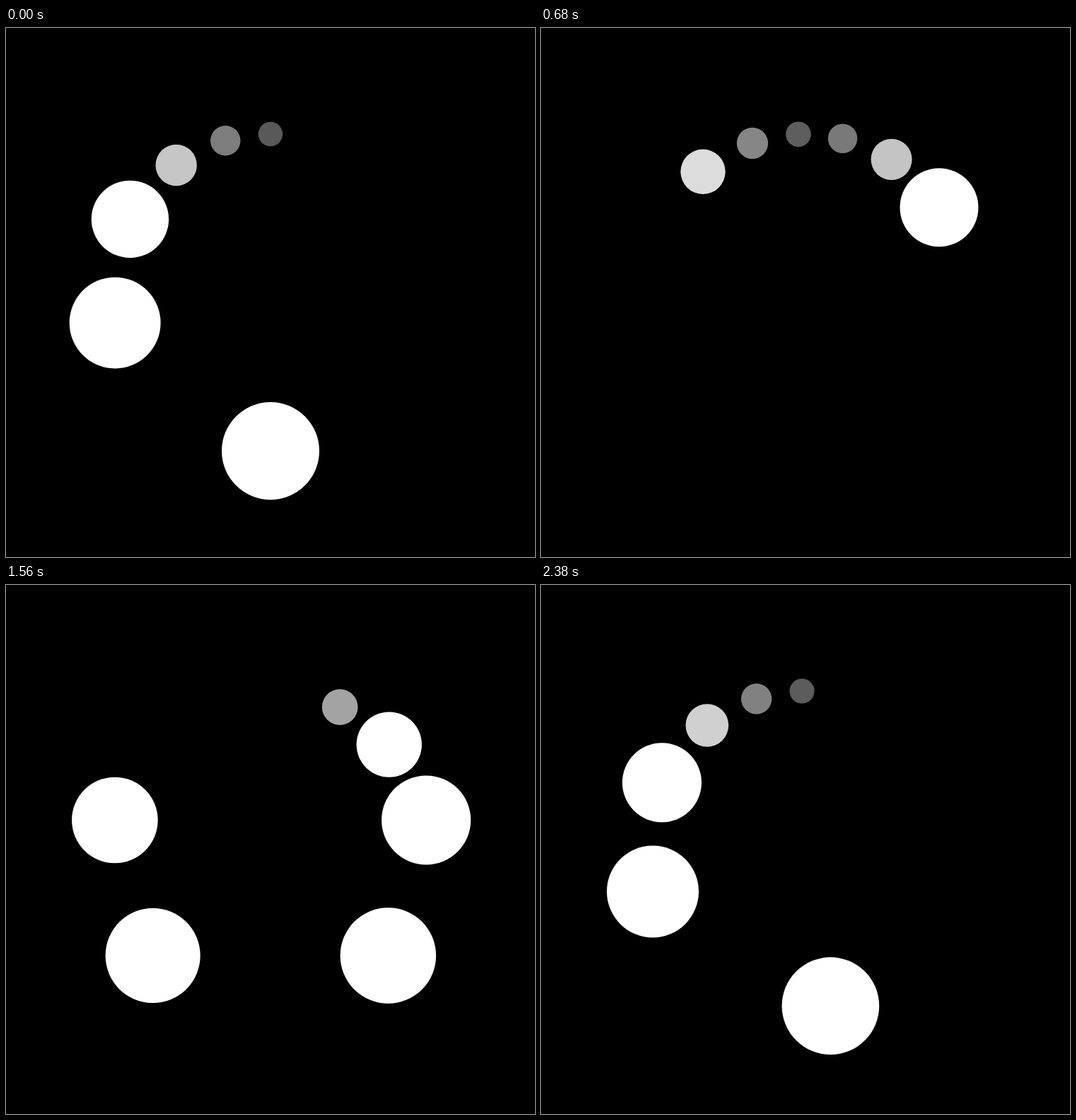
An HTML page with a canvas for the animation above (2.4 s loop, 748 by 748 pixels).

```html
<!DOCTYPE html>
<html lang="en">
<head>
<meta charset="utf-8">
<title>Orbiting dots</title>
<style>
  html, body { margin: 0; width: 100%; height: 100%; overflow: hidden; background: #000; }
  canvas { display: block; }
</style>
</head>
<body>
<canvas id="stage" width="748" height="748"></canvas>
<script>
const ctx = document.getElementById('stage').getContext('2d');
const SIZE = 748, CENTER = SIZE / 2, ORBIT = 224;
const SMALL = 17.3, LARGE = 69;
const LOOP = 2400, STEP = 20, DOTS = 6, GAP = LOOP / 10;

// Easing with the same control points as CSS cubic-bezier()
function bezier(x1, y1, x2, y2) {
  const at = (a, b, t) => 3 * a * t * (1 - t) ** 2 + 3 * b * t * t * (1 - t) + t ** 3;
  return x => {
    let low = 0, high = 1;
    for (let i = 0; i < 24; i++) {
      const mid = (low + high) / 2;
      if (at(x1, x2, mid) < x) low = mid; else high = mid;
    }
    return at(y1, y2, (low + high) / 2);
  };
}

const turn = bezier(.78, .33, .22, .67);
const grow = bezier(.78, .24, .2, .84);
const shrink = bezier(.78, .26, .18, .76);

// One lap runs from the top (0) through the bottom (0.5) back to the top (1).
function drawDot(lap) {
  const angle = 2 * Math.PI * turn(lap);
  const swell = lap < .5 ? grow(2 * lap) : 1 - shrink(2 * lap - 1);
  const radius = SMALL + (LARGE - SMALL) * swell;
  const gray = Math.min(255, Math.round(9.1 * radius - 68));
  ctx.fillStyle = `rgb(${gray},${gray},${gray})`;
  ctx.beginPath();
  ctx.arc(CENTER + ORBIT * Math.sin(angle), CENTER - ORBIT * Math.cos(angle), radius, 0, 2 * Math.PI);
  ctx.fill();
}

function draw(time) {
  const t = Math.floor((time % LOOP) / STEP) * STEP;
  ctx.fillStyle = '#000';
  ctx.fillRect(0, 0, SIZE, SIZE);
  for (let k = 0; k < DOTS; k++) drawDot((t + LOOP / 2 + k * GAP) % LOOP / LOOP);
}

let start;
function tick(now) {
  start ??= now;
  draw(now - start);
  requestAnimationFrame(tick);
}
draw(0);
requestAnimationFrame(tick);
</script>
</body>
</html>
```
